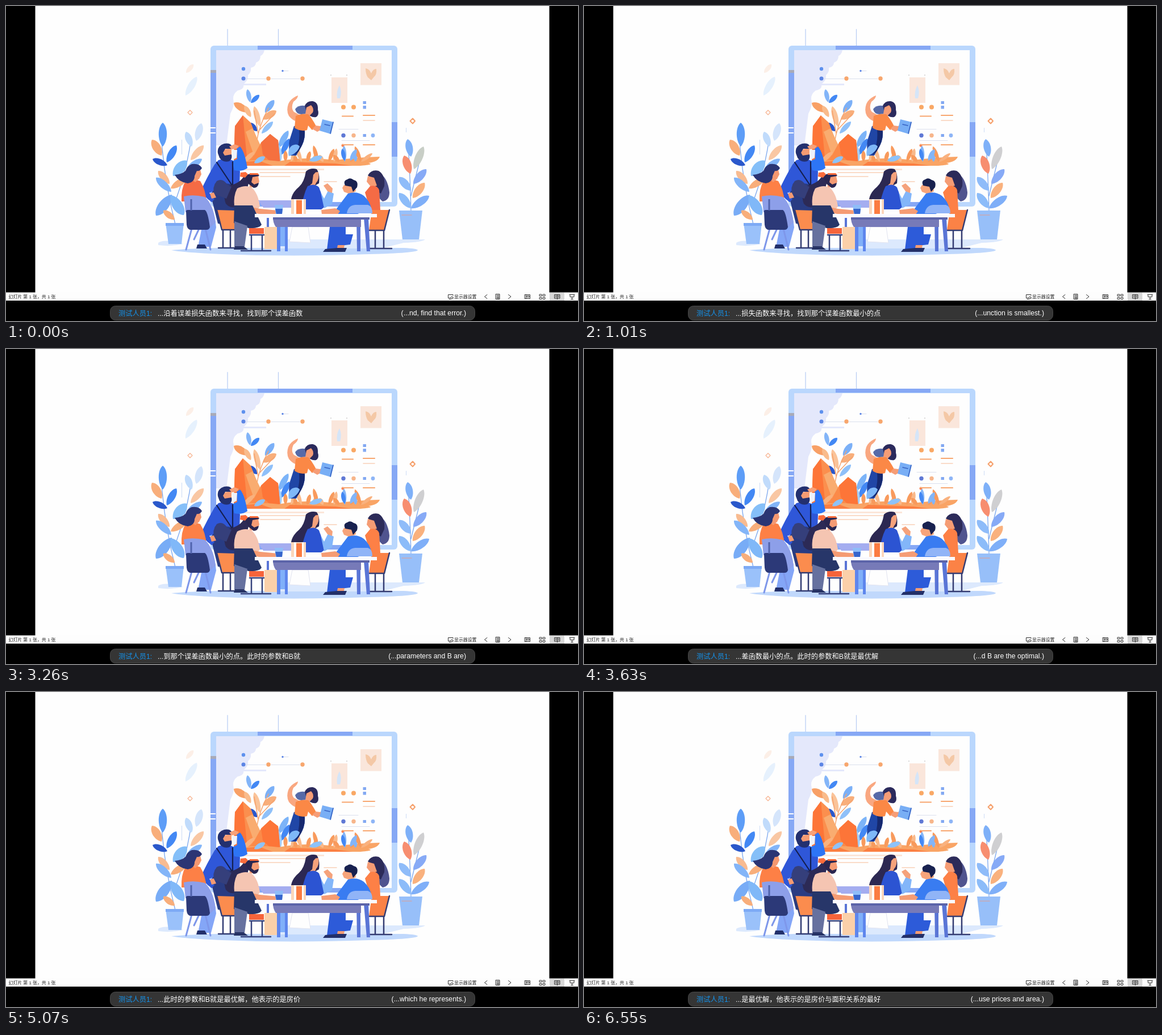
Animation, 1007 px wide and 556 px high, one loop 6910 ms. Source, as an HTML page:

```html
<!DOCTYPE html>
<html>
<head>
<meta charset="utf-8">
<title>Captioned slide</title>
<style>
html, body { margin: 0; width: 100%; height: 100%; overflow: hidden; background: #000; }
svg { display: block; --shirt: #f56b45; --gray: #c8cec6; --rock: #f5703f; }
svg.warm { --shirt: #fd8046; --gray: #cfcfd1; --rock: #fd7538; }
text { font-family: 'Liberation Sans', 'Noto Sans CJK SC', 'Noto Sans CJK', sans-serif; white-space: pre; }
.cap { font-size: 12.25px; fill: #fff; }
.bar { font-size: 7.9px; fill: #222; }
.line { fill: none; stroke-linecap: round; stroke-linejoin: round; }
</style>
</head>
<body>
<svg id="stage" width="1007" height="556" viewBox="0 0 1007 556">
<path fill="#fefefe" d="M51.5 0H956.5V506H51.5Z"/>

<!-- floor -->
<path fill="#c0d8fc" d="M291 431Q350 426 440 427H700Q724 428 725 431Q722 436 640 438Q500 443 380 438Q310 435 291 431Z"/>
<path fill="#dce9fd" d="M268 418Q274 413 292 415L312 420Q290 425 268 422ZM480 412H738Q732 417 700 418L660 428H480Z"/>

<!-- board -->
<path class="line" stroke="#b5cbf3" stroke-width="1.2" d="M390 41V70M479.500 41V70"/>
<rect x="360" y="70" width="329" height="284" rx="6" fill="#bad7fd"/>
<path fill="#86a8f5" d="M443 70H610V77H443ZM360 118H370V346H360ZM679 205H689V266H679ZM445 346H590V354H445Z"/>
<path fill="#a9abb8" d="M360 113H370V118H360Z"/>
<path fill="#fefefe" d="M370 78H679V346H370Z"/>
<path fill="#e4e8fb" d="M370 78H455Q453 86 448 88Q448 97 440 100Q440 107 431 109Q432 117 426 122Q427 131 418 138Q420 147 408 149Q399 156 400 164Q403 176 395 190L388 246H370ZM416 137H458V140H416Z"/>
<path stroke="#fff" stroke-width="2" d="M358 215H369M358 224H369"/>
<path class="line" stroke="#dbe0ee" d="M423 128.500H458M467 128.500H517M489 114.500H497M586 217.500H620M591 237.500H640"/>
<g id="dots"></g>
<path fill="#fae6db" d="M624 101H661V139.500H624ZM573 126H601V171H573Z"/>
<path fill="#f4c8a6" d="M633 110Q640 111 643 119Q646 111 652 111Q653 121 648 125L643 131L637 126Q633 120 633 110Z"/>
<path fill="#d5e5f8" d="M583 163Q581 151 587 140Q592 151 588 163Z"/>
<path class="line" stroke="#f8a66f" stroke-width="2.200" d="M592 194.500H611M629 193H649M592 245H611M629 245H649"/>
<path class="line" stroke="#f9d0b6" stroke-width="1.600" d="M629 202H649M447 294H545M448 301H500M560 310H582"/>
<path fill="#fbe6d9" d="M414 287H560V290H414Z"/>

<!-- scenery on the board -->
<g id="shrub"></g>
<path class="line" stroke="#f6a36e" stroke-width="1.500" d="M441 240Q446 210 462 180M447 218L473 190M444 225L437 185"/>
<path fill="#fb8f4e" d="M417 193L431 206L441 232L445 279H401L403 212Z"/>
<path fill="var(--rock)" d="M417 193L403 212L401 272L425 277L420 225Z"/>
<path fill="#f9ac70" d="M422 222L434 216L450 250L440 274Z"/>
<path fill="#fb8a49" d="M465 226L479 237L483 279H428L449 241Z"/>
<path fill="var(--rock)" d="M465 226L449 241L452 262L470 279H483L479 237Z"/>
<path fill="#f9a465" d="M402 278Q430 268 480 274Q520 265 580 272Q620 267 658 266Q655 275 638 277Q650 280 624 282H410Z"/>
<path fill="#fb7f42" d="M404 277L445 273L470 282H410ZM500 275L580 278L610 282H490Z"/>
<g id="bush"></g>

<!-- presenter -->
<path fill="#f9a780" d="M516 205Q505 203 498 194Q493 185 497 173Q501 163 514 158Q514 163 506 169Q501 180 507 187L520 194Z"/>
<path fill="#2046a6" d="M507 212Q522 209 526 221Q527 239 518 251L511 264H500Q497 250 499 237Z"/>
<path fill="#16296f" d="M515 212Q525 210 526 222Q527 239 515 257L508 263Q520 238 515 212Z"/>
<path fill="#7fb8f8" d="M498 265Q495 252 504 246Q513 242 517 248Q513 260 498 265Z"/>
<path fill="#566aa8" d="M529 177Q516 173 509 182Q511 191 520 191L533 190Z"/>
<path fill="#2b2a5c" d="M526 176Q530 167 540 168Q550 170 549 183Q552 192 546 196Q537 198 529 188Z"/>
<path fill="#f69d76" d="M529 179L537 175Q543 181 540 188L533 195L527 190Z"/>
<path fill="#fb8846" d="M510 194Q520 189 532 191Q538 197 546 212L539 219L532 211L530 219Q518 222 508 215Z"/>
<path fill="#f69d76" d="M539 217L545 211L553 212L560 208L559 216L548 222Z"/>
<path fill="#78aef5" d="M557 200L577 205L572 226L552 220Z"/>
<path class="line" stroke="#3762c2" stroke-width="1.500" d="M576 205L571 225M561 209L570 211"/>

<!-- plants -->
<path class="line" stroke="#7ba7ee" stroke-width="1.300" d="M274 240Q280 315 298 385M325 240Q318 290 298 345M709 260Q712 320 713 362M729 270L713 335"/>
<g id="plants"></g>
<path fill="#9ac1fa" d="M281 383H313L309 420H286Z"/>
<path fill="#7daaf5" d="M281 383H313V388H281Z"/>
<path fill="#97bff9" d="M692 361H733L727 412H698Z"/>
<path class="line" stroke="#c9a9b2" stroke-width="1.500" d="M697 369H714"/>
<path class="line" stroke="#f7b492" stroke-width="1.300" d="M324 184L328 188L324 192L320 188Z"/>
<path class="line" stroke="#f6a06b" stroke-width="2" d="M716 198.500L720 203L716 207.500L711.500 203Z"/>
<path stroke="#cddcf6" d="M704.500 215V223M309.500 236V262"/>

<!-- standing man -->
<path fill="#293c83" d="M365 308L399 306L405 360L396 388L373 384L362 340Z"/>
<path fill="#2f57d8" d="M374 272Q390 267 402 274L412 292L411 318Q385 311 368 313L366 326L358 330L367 341L362 346Q348 337 344 324Q353 304 367 280Z"/>
<path fill="#2d75f5" d="M398 274L407 270L406 252L412 248Q420 256 425 286Q416 293 402 290Z"/>
<path fill="#f59b72" d="M378 254L397 251V263L389 270L379 266ZM359 331L366 329L370 338L362 340Z"/>
<path fill="#23306f" d="M373 260Q371 247 384 243Q395 241 398 248L397 252L386 252L382 259L385 264L397 262Q399 270 393 274Q382 277 376 268Z"/>
<path fill="#eef2fc" d="M398 254H407L406 268L400 271Z"/>
<path fill="#f6a17a" d="M393 248L402 244L410 247L406 252L397 253Z"/>
<path class="line" stroke="#141f4f" stroke-width="2.200" d="M371 276L399 318V275"/>

<!-- woman on the left -->
<path fill="#84a6f7" d="M347 342Q367 354 370 391L361 425H338L345 390Z"/>
<path fill="#222f6a" d="M337 421H350L354 428H335Z"/>
<path fill="var(--shirt)" d="M316 309Q331 304 342 309Q351 323 353 345H309Q308 322 316 309Z"/>
<path fill="#f59870" d="M329 289H342L344 297L340 305L333 311L327 306Z"/>
<path fill="#2b3574" d="M345 286Q340 277 327 279Q319 282 316 291Q309 297 297 298Q304 311 320 313Q332 311 332 300L336 291Q342 292 345 286Z"/>
<path fill="#8d9fe9" d="M313 336Q330 332 350 337Q365 350 369 382L359 391L349 361L316 364Z"/>
<path class="line" stroke="#7e97ea" stroke-width="3" d="M327 393L317 430M351 393L360 430M340 393L331 412"/>
<path fill="#2c3978" d="M317 362Q317 360 320 360H350Q355 362 359 390Q358 395 353 395H324Q319 394 318 386Z"/>
<path stroke="#5063ad" stroke-width="3" d="M326 341V361"/>

<!-- man with the headband -->
<path fill="#2c2a56" d="M420 298Q413 313 393 317Q380 331 387 349Q395 358 405 354L425 321L430 302Z"/>
<path fill="#353f7b" d="M371 309Q382 303 390 316L397 319L388 340L367 332Q362 321 371 309Z"/>
<path fill="#f59b73" d="M427 300H444L446 310L440 320L429 320Z"/>
<path fill="#292650" d="M421 302Q425 294 443 296L446 300L434 302L432 311L437 315L445 312Q444 321 436 321L427 314Z"/>
<path fill="#fb6c3b" d="M413 294L422 293L426 297L421 303L412 301ZM429 295H443L446 298H429Z"/>
<path fill="#f5c5b2" d="M407 322Q421 315 432 320Q444 330 447 354L437 365L402 354Q400 335 407 322Z"/>
<path fill="#f59b73" d="M432 355L448 358L479 361L478 367H446L433 365Z"/>
<path fill="#fb8c4e" d="M371 360L403 361L407 396L381 394Z"/>
<path class="line" stroke="#313b72" stroke-width="2.500" d="M371 360L380 395H406M382 395V426M395 395V426M374 427H402"/>
<path fill="#273669" d="M402 352H434L450 386Q446 393 427 392L401 383Z"/>
<path fill="#66719f" d="M402 380L425 388L420 425H402Z"/>
<path fill="#273365" d="M403 424H418L426 430H401Z"/>
<path fill="#f6643b" d="M428 392H454V402H428Z"/>
<path class="line" stroke="#35427c" stroke-width="2.500" d="M429 404H455M432 404V432M451 404V432M414 432H466"/>

<!-- woman in the middle -->
<path fill="#a4adf0" d="M444 343H510L516 356H453Z"/>
<path fill="#2c2852" d="M528 292Q536 285 547 288Q553 296 551 313Q537 319 532 337L518 343Q508 345 502 341Q504 329 516 319Q525 311 528 292Z"/>
<path fill="#f5a27b" d="M538 294L550 293Q552 306 546 312L542 321L533 315Z"/>
<path fill="#2c2852" d="M530 291L548 290L541 298L539 313L532 319Z"/>
<path fill="#2c54d2" d="M531 318Q543 312 551 320L563 353L555 359H520Q523 333 531 318Z"/>
<path fill="#83b6f9" d="M554 329L560 340L567 326L577 331L574 350L560 357Z"/>
<path fill="#f5a27b" d="M566 327L559 317L566 313L575 322L574 330Z"/>

<!-- woman on the right -->
<path fill="#50548f" d="M656 294Q672 302 675 329Q675 343 663 345Q653 338 653 322Z"/>
<path fill="#2c2b59" d="M637 299Q643 288 656 291Q668 298 666 318L660 331Q648 326 647 307Z"/>
<path fill="#f59c74" d="M637 300L648 303L653 317L643 320L635 310Z"/>
<path fill="var(--shirt)" d="M641 318Q653 315 657 325L659 360H641L632 329Z"/>
<path fill="#fb8246" d="M644 360H675L666 396H639Z"/>
<path class="line" stroke="#343c72" stroke-width="2.500" d="M675 360L666 396H640M665 397V427M650 397V427M640 428H679"/>

<!-- boy -->
<path fill="#2d5bd9" d="M570 390H598V403H611L606 421L589 423L583 430H565Z"/>
<path fill="#f59c74" d="M584 422H596L595 427H583Z"/>
<path fill="#233069" d="M562 429L583 427H600L597 434H558Z"/>
<path fill="#f7a47a" d="M595 316L614 315L616 327L606 332L595 328L592 321Z"/>
<path fill="#18214f" d="M597 317Q593 308 601 306Q606 302 612 307Q621 309 618 320L611 328L608 319Z"/>
<path fill="#397cf1" d="M602 331Q618 326 630 335Q641 345 643 358L619 367H583L581 359Z"/>
<path fill="#f59c74" d="M555 360L580 357L588 362L584 368H556Z"/>
<path fill="#90b4f7" d="M600 366Q602 352 615 351H637Q645 353 645 366Z"/>

<!-- table -->
<path fill="#8fbdf8" d="M473 351H488L486 367H475Z"/>
<path fill="#3665cc" d="M474 358H487L486 367H476Z"/>
<path fill="#fbd6bb" d="M502 341H528V367H502Z"/>
<path fill="#fb7c42" d="M511 343H521V367H511Z"/>
<path fill="#fff" d="M507 341H511V367H507ZM521 341H524V367H521Z"/>
<path fill="#fbd0a9" d="M455 390H477V429H455Z"/>
<path fill="#fefefe" stroke="#e1e3f0" d="M504 390L499 416L536 418L532 390Z"/>
<path fill="#80b0f9" d="M483 390H492V424H483Z"/>
<path fill="#5e86ed" d="M477 390H483V433H477ZM491 390H496V433H491Z"/>
<path fill="#5a75d6" d="M617 374H624V433H618ZM630 374H638L641 433H635ZM459 374H463V390H459Z"/>
<path fill="#777ab8" d="M470 373H625V390H475Q470 383 470 373Z"/>
<path fill="#5c64a9" d="M470 373H640V377H470Z"/>
<path fill="#fafaff" d="M438 367H653V373H438Z"/>

<!-- status bar -->
<path fill="#fdfdfd" d="M0 505.500H1007V520H0Z"/>
<path fill="#d8d8d8" d="M957 506H983V520H957Z"/>
<text class="bar" x="4.500" y="516">幻灯片 第 1 张，共 1 张</text>
<text class="bar" x="789" y="516">显示器设置</text>
<g class="line" stroke="#333">
<path d="M787 511V509.500H778.500V515.500H782M780 517.500H783M847 509.500L842.500 513L847 516.500M884.500 509.500L889 513L884.500 516.500"/>
<circle cx="785" cy="515" r="2"/>
<path d="M862.500 508.500H869V517.500H862.500ZM864 510.500H868M864 512.500H868M864 514.500H868M864 516H868"/>
<path d="M913.500 509.500H922.500V516.500H913.500ZM915.500 509.500V516.500M917.500 511.500H921V514H917.500Z"/>
<path d="M939.500 509H943V512H939.500ZM945.500 509H949V512H945.500ZM939.500 514.500H943V517.500H939.500ZM945.500 514.500H949V517.500H945.500Z"/>
<path d="M966 509.500H975V516H966ZM970.500 509.500V517.500M967.500 511.500H969M967.500 513.500H969M972 511.500H973.500M972 513.500H973.500"/>
<path d="M992 509.500H1001M993 509.500V513.500H1000V509.500M996.500 513.500V517.500M994.500 517.500H998.500"/>
</g>

<!-- caption -->
<rect x="183.500" y="529.500" width="642" height="25" rx="9" fill="#353535" stroke="#484848"/>
<text class="cap" x="198" y="546.500" style="fill:#1493ec">测试人员1:</text>
<text class="cap" id="zh" x="267" y="546.500"></text>
<text class="cap" id="en" x="810" y="546.300" text-anchor="end"></text>
</svg>
<script>
const $ = id => document.getElementById(id);

// A leaf from its base to its tip, w wide.
function leaf([x, y, tx, ty, w, fill]) {
  const dx = tx - x, dy = ty - y, len = Math.hypot(dx, dy);
  const nx = -dy / len * w * .6, ny = dx / len * w * .6;
  const at = (k, s) => `${(x + dx * k + nx * s).toFixed(1)} ${(y + dy * k + ny * s).toFixed(1)}`;
  return `<path fill="${fill}" d="M${x} ${y}C${at(.25, 1)} ${at(.82, 1)} ${tx} ${ty}C${at(.82, -1)} ${at(.25, -1)} ${x} ${y}Z"/>`;
}
const grow = (id, leaves) => $(id).innerHTML += leaves.map(leaf).join('');

const sky = '#83b5f8', pale = '#d5e5fb', blue = '#4388f4', peach = '#f8ae7b', deep = '#2a58cb';

grow('plants', [
  [276, 248, 276, 206, 16, '#5d9df7'], [274, 264, 257, 236, 16, peach],
  [283, 276, 300, 246, 14, blue], [284, 281, 258, 270, 12, deep],
  [294, 300, 318, 273, 20, '#85bff8'], [288, 314, 268, 291, 13, '#f8bb91'],
  [291, 328, 264, 303, 14, sky], [290, 322, 318, 304, 13, peach],
  [335, 238, 344, 207, 14, pale], [327, 248, 317, 222, 13, '#c0dbfb'],
  [325, 272, 348, 246, 13, '#f9c7a3'], [318, 288, 345, 270, 12, sky],
  [292, 333, 264, 370, 20, '#78acf6'], [290, 334, 313, 369, 20, '#80b8f8'],
  [297, 377, 277, 361, 12, peach]
]);
grow('plants', [
  [317, 118, 330, 103, 9, '#fcefe7'], [316, 158, 336, 125, 13, '#e6f1fd'],
  [713, 266, 707, 235, 14, '#7eb0f8'], [718, 288, 735, 248, 15, 'var(--gray)'],
  [712, 296, 701, 264, 16, '#f78e70'], [717, 314, 740, 288, 15, '#87aaf6'],
  [713, 326, 692, 302, 15, '#8fbcf9'], [716, 339, 737, 312, 15, '#f9b17e'],
  [713, 357, 692, 330, 15, '#8cbcf9'], [713, 357, 745, 335, 15, '#7faff8']
]);
grow('shrub', [
  [427, 187, 401, 171, 14, '#f8a066'], [430, 170, 425, 147, 9, sky],
  [431, 171, 446, 157, 9, blue], [431, 196, 420, 176, 10, '#f9bb8b'],
  [456, 188, 472, 166, 12, '#7bb0f7'], [452, 200, 476, 185, 13, peach],
  [447, 213, 437, 177, 11, '#fac399'], [450, 225, 470, 204, 10, '#8fc0f9'],
  [442, 221, 429, 206, 10, deep], [480, 250, 497, 220, 12, '#7cb4f8'],
  [484, 263, 499, 234, 11, blue], [483, 276, 478, 243, 11, '#a5cffa']
]);
const tufts = [];
for (let i = 0; i < 15; i++) {
  const x = 492 + i * 9.5, tall = 17 + 9 * Math.sin(i * 2.4);
  const tint = i > 9 && i % 2 ? sky : i % 2 ? '#f9b98a' : '#f89a5c';
  tufts.push([x, 275, x + 11 * Math.sin(i * 1.7), 272 - tall, 8, tint]);
}
grow('bush', [...tufts,
  [437, 277, 456, 266, 10, '#8dc2f9'], [534, 273, 557, 266, 10, '#8dc2f9'],
  [596, 273, 592, 252, 8, blue], [606, 273, 617, 253, 9, sky],
  [625, 275, 645, 260, 7, '#f9b17e'], [416, 277, 438, 257, 9, '#f9b17e']
]);

$('dots').innerHTML = [
  [418, 111, 3.2, '#5e91ee'], [418, 128, 3.5, '#5c85e5'], [462, 128, 3.7, '#f7a66d'],
  [522, 128, 3.7, '#f7a66d'], [487, 114.5, 1.7, '#5c85e5'], [594, 178.5, 4, '#f9a865'],
  [612, 178.5, 4, '#f9a865'], [594, 228.5, 3.7, '#6079d5'], [612, 228.5, 3.7, '#f7b68b'],
  [646, 228.5, 3.4, '#8eb5f6'], [593, 246, 2.5, '#f8764a'], [572, 122, .8, '#aaa'], [600, 122, .8, '#aaa']
].map(([x, y, r, c]) => `<circle cx="${x}" cy="${y}" r="${r}" fill="${c}"/>`).join('') +
  '<path fill="#83a9f2" d="M628.500 168H634V173H628.500ZM628.500 176H634V181.500H628.500ZM628.500 226H634V231H628.500Z"/>';

// The caption shows the last 20 characters heard so far.
const speech = '沿着误差损失函数来寻找，找到那个误差函数最小的点。此时的参数和B就是最优解，他表示的是房价与面积关系的最好';
const heard = [[0, 20], [380, 22], [770, 24], [1170, 27], [1760, 30], [2140, 31], [2630, 33],
  [3320, 37], [4040, 40], [4480, 43], [5010, 45], [5470, 48], [5880, 51], [6400, 53]];
const translated = [
  [0, 'nd, find that error.'], [510, ' that error function'], [1010, 'unction is smallest.'],
  [1230, 'e smallest. At this.'], [1860, 'mallest at this time'], [2230, ' time the parameter.'],
  [2470, 'e the parameters and'], [3260, 'parameters and B are'], [3630, 'd B are the optimal.'],
  [4100, 'he optimal solution.'], [4610, 'olution, he represen'], [5070, 'which he represents.'],
  [5570, 'ents the house price'], [6060, 'house price and area'], [6550, 'use prices and area.']
];
const latest = (steps, t) => steps.reduce((v, [at, next]) => t >= at ? next : v, steps[0][1]);
const put = (id, s) => { if ($(id).textContent !== s) $(id).textContent = s; };

const LOOP = 6910, start = performance.now();
function draw() {
  const t = (performance.now() - start) % LOOP;
  const end = latest(heard, t);
  put('zh', '...' + speech.slice(end - 20, end));
  put('en', '(...' + latest(translated, t) + ')');
  $('stage').classList.toggle('warm', t >= 770);
  requestAnimationFrame(draw);
}
draw();
</script>
</body>
</html>
```
